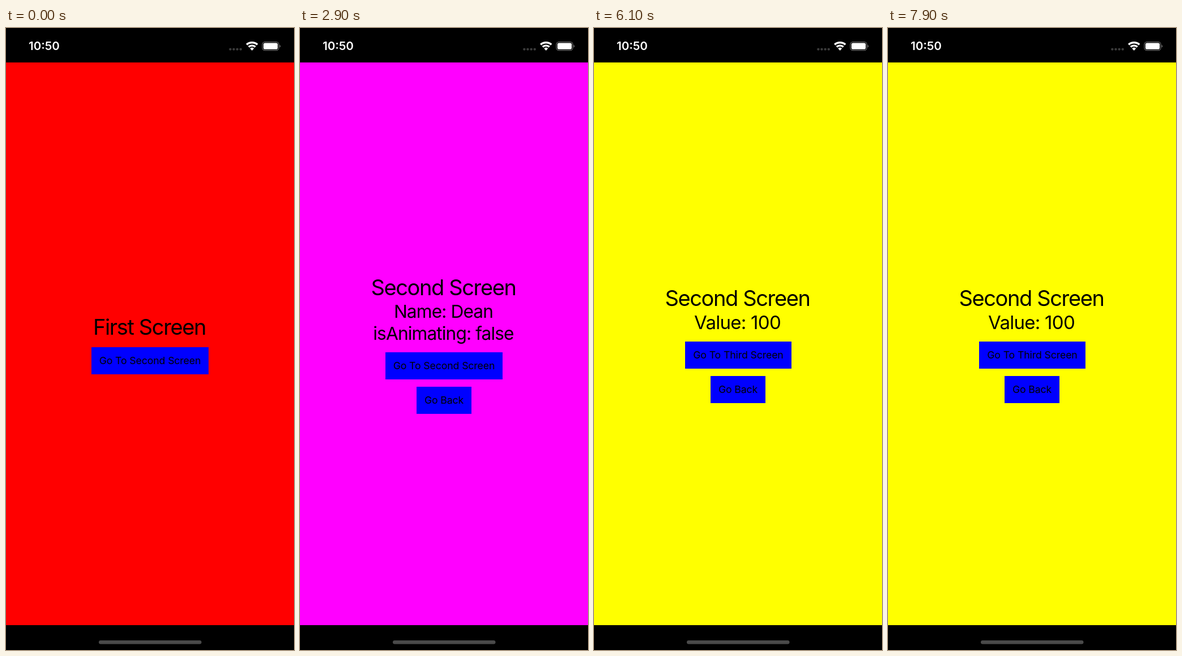
Animation, 509 px wide and 1101 px high, one loop 8000 ms. Source, as an HTML page:

```html
<!DOCTYPE html>
<html lang="en">
<head>
<meta charset="utf-8">
<title>Stack navigation</title>
<style>
  html, body { margin: 0; width: 100%; height: 100%; overflow: hidden; background: #000; }
  #stage {
    position: relative; width: 509px; height: 1101px; overflow: hidden; background: #000;
    font-family: Inter, Roboto, sans-serif; font-optical-sizing: none; color: #000;
  }
  #cards {
    position: absolute; left: 0; top: 61px; width: 509px; height: 996px;
    clip-path: inset(.34px 0 .4px 0);
  }
  .card { position: absolute; inset: 0; will-change: transform; }
  .line { position: absolute; left: 0; width: 507px; text-align: center; white-space: pre; line-height: 48px; }
  .title { font-size: 38px; letter-spacing: -.036em; }
  .value { font-size: 33px; letter-spacing: -.022em; }
  .info { font-size: 31.7px; letter-spacing: -.028em; }
  .button {
    position: absolute; height: 48px; background: #00f; text-align: center; white-space: pre;
    font-size: 17.7px; line-height: 48px; letter-spacing: -.007em;
  }
  #clock {
    position: absolute; left: 40px; top: 20px; line-height: 24px;
    font-size: 20.5px; font-weight: 600; color: #fff;
  }
  svg { position: absolute; left: 0; top: 0; }
</style>
</head>
<body>
<div id="stage">
  <div id="cards"></div>
  <div id="clock">10:50</div>
  <svg width="509" height="1101" viewBox="0 0 509 1101">
    <g fill="#3c3c3c">
      <circle cx="396.4" cy="37.6" r="2.2"/><circle cx="402.5" cy="37.6" r="2.2"/>
      <circle cx="408.7" cy="37.6" r="2.2"/><circle cx="414.8" cy="37.6" r="2.2"/>
    </g>
    <g id="wifi" transform="translate(434.8 40)" fill="none" stroke="#fff" stroke-width="3.4"></g>
    <rect x="453.1" y="24.6" width="29" height="15" rx="4.6" fill="none" stroke="#6a6a6a" stroke-width="1.3"/>
    <rect x="455" y="26.5" width="25.2" height="11.2" rx="2.8" fill="#fff"/>
    <path d="M483.6 29.8q1.7 .8 1.7 2.4t-1.7 2.4z" fill="#6a6a6a"/>
    <rect x="164" y="1084" width="181.5" height="6.5" rx="3.25" fill="#4a4a4a"/>
  </svg>
</div>
<script>
const WIDTH = 509, TOP = 61, LOOP = 8000, STEP = 100;
const SPRING = Math.sqrt(1000 / 3);   // natural frequency of the push, 1/s
const SETTLE = 560, PRESS_LEAD = 45, RELEASE = 250;
const PUSHES = [456, 2340, 4456, 6150, 7350];

const cards = document.getElementById('cards');

function add(parent, cls, text, style) {
  const el = document.createElement('div');
  el.className = cls;
  el.textContent = text;
  Object.assign(el.style, style);
  parent.append(el);
  return el;
}

const line = (card, cls, text, y) =>
  add(card, 'line ' + cls, text, { top: y - TOP - 24 + 'px' });

const button = (card, text, x, y, w) =>
  add(card, 'button', text, { left: x + 'px', top: y - TOP + 'px', width: w + 'px' });

function makeCard(color, build) {
  const el = add(cards, 'card', '', { background: color });
  return { el, next: build(el) };
}

const first = () => makeCard('#f00', el => {
  line(el, 'title', 'First Screen', 529);
  return button(el, 'Go To Second Screen', 151, 565, 207);
});

const second = value => makeCard('#ff0', el => {
  line(el, 'title', 'Second Screen', 478);
  line(el, 'value', 'Value: ' + value, 521);
  button(el, 'Go Back', 206, 616, 97);
  return button(el, 'Go To Third Screen', 161, 555, 188);
});

const third = animating => makeCard('#f0f', el => {
  line(el, 'title', 'Second Screen', 459);
  line(el, 'info', 'Name: Dean', 502);
  line(el, 'info', 'isAnimating: ' + animating, 541);
  button(el, 'Go Back', 206, 635, 97);
  return button(el, 'Go To Second Screen', 151, 574, 207);
});

const stack = [first(), second(2), third(false), second(100), third(true), second(100)];

// Critically damped spring from 0 to 1
function progress(start, t) {
  const ms = t - start;
  if (ms <= 0) return 0;
  if (ms >= SETTLE) return 1;
  const k = SPRING * ms / 1000;
  return 1 - (1 + k) * Math.exp(-k);
}

function pressOpacity(start, t) {
  const ms = t - start;
  if (ms < -PRESS_LEAD || ms >= RELEASE) return 1;
  if (ms <= 0) return .2;
  const p = ms / RELEASE;
  return .2 + .8 * p * p * (3 - 2 * p);
}

// Each new card slides in over the one below, which stays in place
function draw(t) {
  stack.forEach(({ el, next }, i) => {
    const enter = i ? progress(PUSHES[i - 1], t) : 1;
    const pushed = i < PUSHES.length;
    const covered = pushed && progress(PUSHES[i], t) === 1;
    el.style.visibility = enter > 0 && !covered ? 'visible' : 'hidden';
    el.style.transform = `translateX(${Math.round(WIDTH * (1 - enter))}px)`;
    next.style.opacity = pushed ? pressOpacity(PUSHES[i], t) : 1;
  });
}

function drawWifi() {
  const a = 42 * Math.PI / 180;
  const arc = r => {
    const x = r * Math.sin(a), y = -r * Math.cos(a);
    return `M${-x} ${y}A${r} ${r} 0 0 1 ${x} ${y}`;
  };
  document.getElementById('wifi').innerHTML =
    `<path d="${arc(14.3)}"/><path d="${arc(8.9)}"/>` +
    `<path d="${arc(5.2)}L0 0z" fill="#fff" stroke="none"/>`;
}

function tick() {
  const t = performance.now() % LOOP;
  draw(Math.floor(t / STEP) * STEP);
  requestAnimationFrame(tick);
}

drawWifi();
draw(0);
requestAnimationFrame(tick);
</script>
</body>
</html>
```
